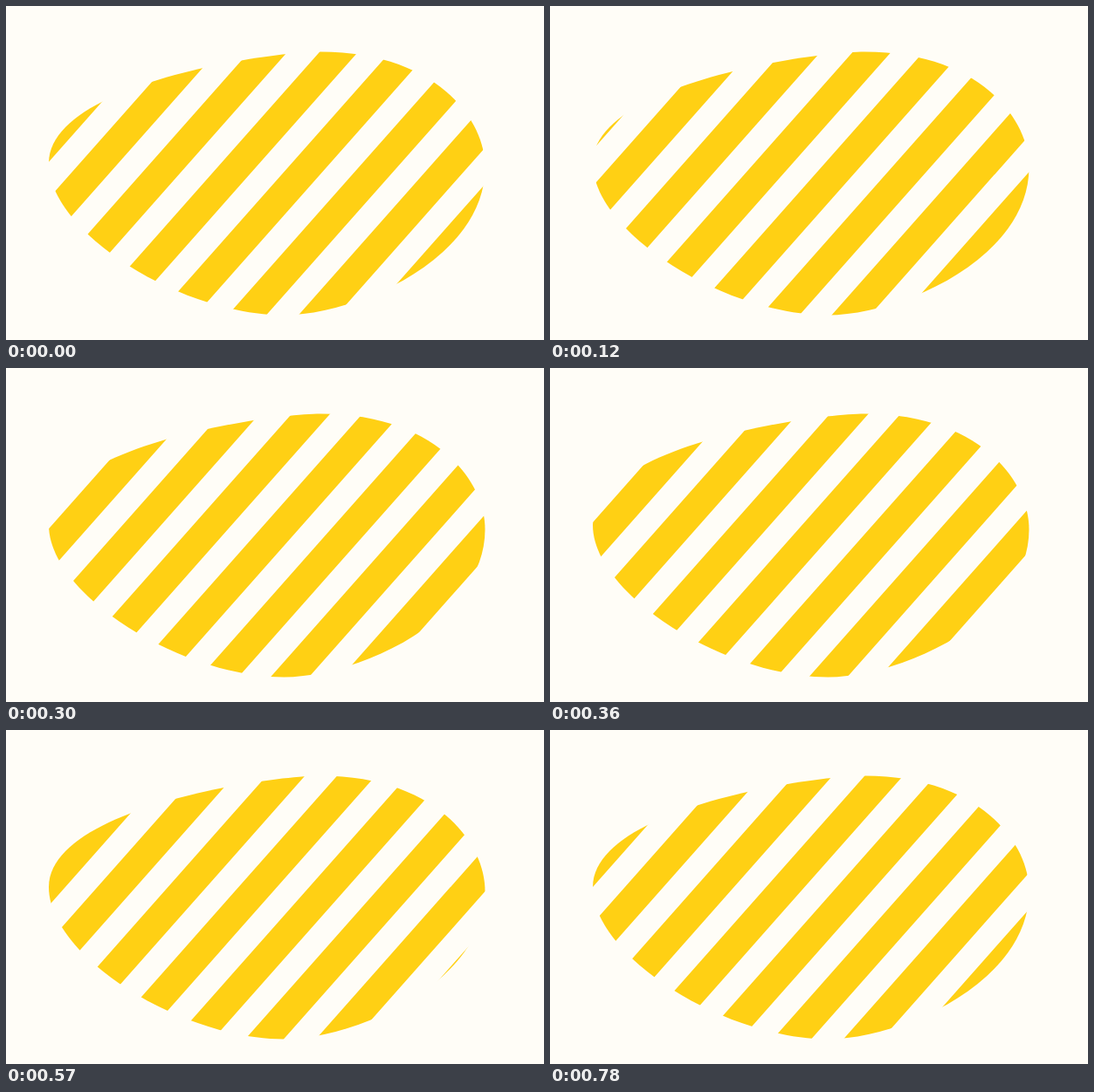
Animation, 616 px wide and 383 px high, one loop 0.81 s. Source, as an HTML page:

```html
<!DOCTYPE html>
<html lang="en">
<head>
<meta charset="utf-8">
<title>Striped oval</title>
<style>
  html, body { margin: 0; width: 100%; height: 100%; overflow: hidden; background: #fffdf7; }
  svg { display: block; }
  #stripes { fill: none; stroke: #ffd014; stroke-width: 400; stroke-dasharray: 44 36.85; }
</style>
</head>
<body>
<svg width="616" height="383" viewBox="0 0 616 383">
  <clipPath id="oval">
    <path d="M49 180C49 90 299 52.5 360 52.5C489 52.5 548.5 127 548.5 185C548.5 290 400 354.5 318 354.5C201 354.5 49 260 49 180Z"/>
  </clipPath>
  <g clip-path="url(#oval)">
    <path id="stripes" transform="matrix(1 0 -.884 1 163.1 0)" d="M0 200H700"/>
  </g>
</svg>
<script>
  const LOOP = 810, STEP = 30, PITCH = 80.85;
  const stripes = document.getElementById('stripes');

  const bezier = (a, b, s) => 3 * (1 - s) ** 2 * s * a + 3 * (1 - s) * s * s * b + s ** 3;

  // Nearly linear travel that settles at the end of each loop
  function ease(x) {
    let lo = 0, hi = 1;
    for (let i = 0; i < 24; i++) {
      const mid = (lo + hi) / 2;
      if (bezier(0.2, 0.88, mid) < x) lo = mid; else hi = mid;
    }
    return bezier(0.187, 1, lo);
  }

  function draw() {
    const t = Math.floor((performance.now() % LOOP) / STEP) * STEP;
    stripes.style.strokeDashoffset = PITCH * ease(t / LOOP);
    requestAnimationFrame(draw);
  }
  draw();
</script>
</body>
</html>
```
